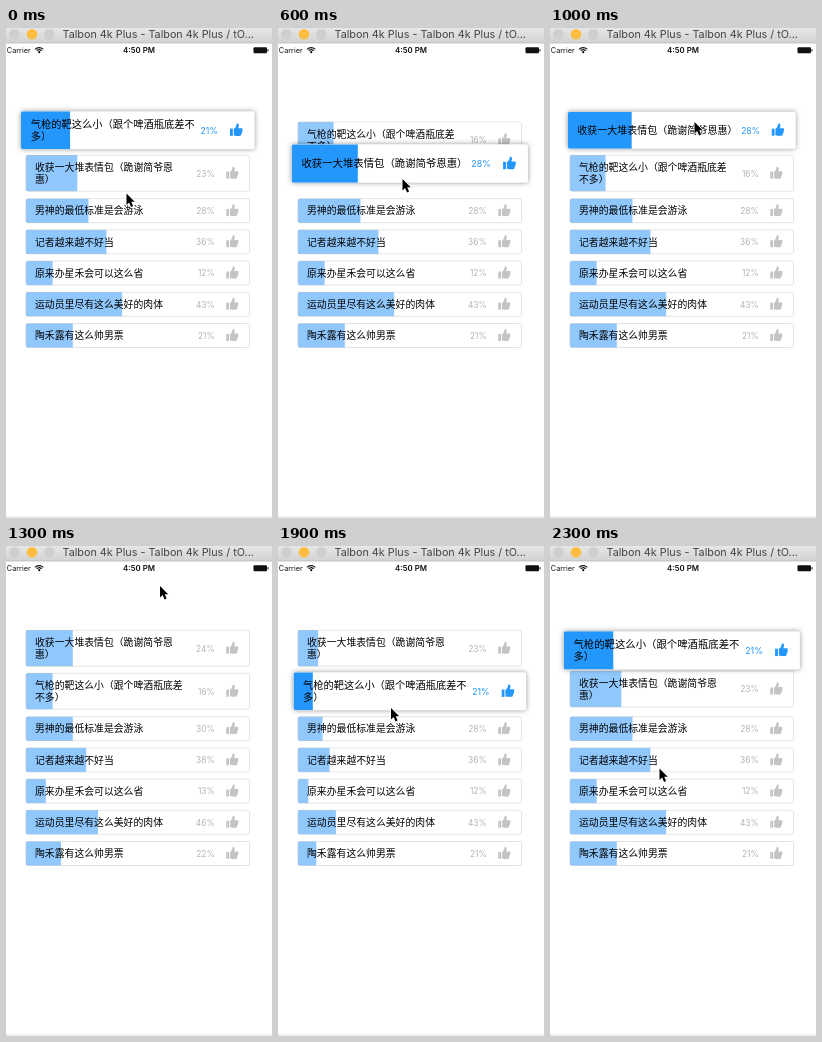
These frames come from a looping animation (266x490 px, 2.4 s). An HTML page with a canvas:

```html
<!DOCTYPE html>
<html lang="zh">
<head>
<meta charset="utf-8">
<title>Poll</title>
<style>
html, body { margin: 0; width: 100%; height: 100%; overflow: hidden; background: #fff; }
canvas { display: block; width: 266px; height: 490px; }
</style>
</head>
<body>
<canvas id="stage"></canvas>
<script>
const W = 266, H = 490, LOOP = 2400, STEP = 100;
const LEFT = 19.7, WIDTH = 224.2, TOP = 84, SWAP = 43;
const BLUE = '#2397fb', PALE = '#90c8fd';
const CJK = '"Noto Sans CJK SC", "Noto Sans CJK", sans-serif';
const LATIN = 'Inter, Roboto, sans-serif';

const canvas = document.getElementById('stage');
const ctx = canvas.getContext('2d');
const dpr = window.devicePixelRatio || 1;
canvas.width = W * dpr;
canvas.height = H * dpr;

// wide: line breaks used while the row is selected
const rows = [
  { lines: ['气枪的靶这么小（跟个啤酒瓶底差', '不多）'], wide: ['气枪的靶这么小（跟个啤酒瓶底差不', '多）'] },
  { lines: ['收获一大堆表情包（跪谢简爷恩', '惠）'], wide: ['收获一大堆表情包（跪谢简爷恩惠）'] },
  { lines: ['男神的最低标准是会游泳'] },
  { lines: ['记者越来越不好当'] },
  { lines: ['原来办星禾会可以这么省'] },
  { lines: ['运动员里尽有这么美好的肉体'] },
  { lines: ['陶禾露有这么帅男票'] }
];

const FIRST = [21, 23, 28, 36, 12, 43, 21];
const SECOND = [16, 28, 28, 36, 12, 43, 21];
const OPEN = [16, 24, 30, 38, 13, 46, 22];
const VOTE_2 = 232, CANCEL = 1200, VOTE_1 = 1742;

// time, x, y of the pointer tip
const pointer = [
  [0, 120.5, 165.5], [300, 124, 150.5], [600, 124.5, 151], [700, 125, 150],
  [1000, 144.5, 94], [1200, 160, 9], [1300, 154, 40], [1600, 113, 162],
  [2100, 113, 162], [2300, 109.5, 222.5], [2400, 120.5, 165.5]
];

const mix = (a, b, p) => a + (b - a) * p;

function ease(t, start, length) {
  const p = Math.min(1, Math.max(0, (t - start) / length));
  return (1 - Math.cos(Math.PI * p)) / 2;
}

function lift(t, vote) {
  return ease(t, vote, 250) - ease(t, vote + 548, 350);
}

function stateAt(t) {
  if (t < VOTE_2) return { sel: 0, pct: FIRST, bars: FIRST, lift: lift(t + LOOP, VOTE_1) };
  if (t < CANCEL) {
    const p = ease(t, VOTE_2 + 28, 300);
    const bars = SECOND.map((v, i) => i === 1 ? v * p : mix(FIRST[i], v, p));
    return { sel: 1, pct: SECOND, bars, lift: lift(t, VOTE_2) };
  }
  if (t < VOTE_1) {
    const p = 1 - ease(t, CANCEL, 300);
    return { sel: -1, pct: OPEN, bars: SECOND.map(v => v * p), lift: 0 };
  }
  const p = ease(t, VOTE_1 + 28, 300);
  return { sel: 0, pct: FIRST, bars: FIRST.map(v => v * p), lift: lift(t, VOTE_1) };
}

function text(str, x, y, font, color, align = 'left') {
  ctx.font = font;
  ctx.fillStyle = color;
  ctx.textAlign = align;
  ctx.textBaseline = 'alphabetic';
  ctx.fillText(str, x, y);
}

function disc(x, y, r, color) {
  ctx.fillStyle = color;
  ctx.beginPath();
  ctx.arc(x, y, r, 0, Math.PI * 2);
  ctx.fill();
}

function box(x, y, w, h, r) {
  ctx.beginPath();
  ctx.roundRect(x, y, w, h, r);
}

function thumb(x, y, color) {
  ctx.save();
  ctx.translate(x, y);
  ctx.fillStyle = color;
  ctx.fillRect(0, 5, 2.7, 7);
  ctx.fill(new Path2D('M3.6 5.2 C5.4 4.4 6 2.6 6.2 .8 C6.4 -.4 8.4 -.2 8.5 1.6 C8.6 2.8 8.1 3.8 7.8 4.6 H11.2 C12.4 4.7 12.4 6 11.8 6.5 C12.3 7.2 12 8.1 11.4 8.4 C11.7 9.2 11.3 9.9 10.8 10.2 C11 11.2 10.4 12 9.4 12 H6 C5 12 4.4 11.5 3.6 11.3 Z'));
  ctx.restore();
}

function drawRow(i, y, h, s) {
  const on = s.sel === i;
  const mid = y + h / 2;
  ctx.save();
  if (on) {
    const k = 1 + 0.054 * s.lift, cx = LEFT + WIDTH / 2;
    ctx.translate(cx, mid);
    ctx.scale(k, k);
    ctx.translate(-cx, -mid);
    ctx.shadowColor = 'rgba(0,0,0,.42)';
    ctx.shadowBlur = 5 * dpr;
  }
  box(LEFT, y, WIDTH, h, 2);
  ctx.fillStyle = '#fff';
  ctx.fill();
  ctx.shadowColor = 'transparent';

  ctx.save();
  ctx.clip();
  ctx.fillStyle = on ? BLUE : PALE;
  ctx.fillRect(LEFT, y, WIDTH * s.bars[i] / 100, h);
  ctx.restore();
  if (!on) {
    box(LEFT + .3, y + .3, WIDTH - .6, h - .6, 2);
    ctx.strokeStyle = 'rgba(190,190,190,.6)';
    ctx.lineWidth = .7;
    ctx.stroke();
  }

  const lines = on && rows[i].wide || rows[i].lines;
  const base = mid + 3.6 - (lines.length - 1) * 6;
  lines.forEach((line, n) => text(line, 29, base + n * 12, '9.85px ' + CJK, '#000'));
  text(s.pct[i] + '%', 208.7, mid + 3.3, '8.4px ' + LATIN, on ? BLUE : '#b4b4b4', 'right');
  thumb(220.3, mid - 6.6, on ? BLUE : '#c4c4c4');
  ctx.restore();
}

function drawRows(t) {
  const s = stateAt(t);
  const shift = SWAP * (ease(t, 490, 350) - ease(t, 2000, 350));
  const draw = i => {
    if (i < 2) drawRow(i, TOP + (i ? SWAP - shift : shift), 36.5, s);
    else drawRow(i, 170.4 + (i - 2) * 31.2, 24.6, s);
  };
  rows.forEach((_, i) => { if (i !== s.sel) draw(i); });
  if (s.sel >= 0) draw(s.sel);
}

function drawChrome() {
  const g = ctx.createLinearGradient(0, 0, 0, 15);
  g.addColorStop(0, '#e6e6e6');
  g.addColorStop(1, '#d2d2d2');
  ctx.fillStyle = g;
  ctx.fillRect(0, 0, W, 15);
  ctx.fillStyle = '#b8b8b8';
  ctx.fillRect(0, 14.6, W, .8);
  disc(8.5, 6.3, 5.3, '#cfcfcf');
  disc(26, 6.3, 5.3, '#fdbc40');
  disc(43.3, 6.3, 5.3, '#cfcfcf');
  text('Talbon 4k Plus - Talbon 4k Plus / tO...', 56.5, 10.3, '10.8px ' + LATIN, '#444');

  text('Carrier', .8, 25, '7.3px ' + LATIN, '#111');
  text('4:50 PM', 133, 25.2, '600 7.8px ' + LATIN, '#111', 'center');
  ctx.strokeStyle = '#111';
  ctx.lineWidth = 1.2;
  for (const r of [3.4, 5.6]) {
    ctx.beginPath();
    ctx.arc(33.2, 25.2, r, -Math.PI * .76, -Math.PI * .24);
    ctx.stroke();
  }
  disc(33.2, 24.2, 1.1, '#111');
  box(247.5, 19.3, 13.5, 6, 1);
  ctx.fillStyle = '#111';
  ctx.fill();
  ctx.fillRect(261.5, 21.2, 1, 2.2);

  ctx.fillStyle = '#dedede';
  ctx.fillRect(0, 488.5, W, 1);
}

function drawPointer(t) {
  const n = pointer.findIndex(k => k[0] > t);
  const [t0, x0, y0] = pointer[n - 1], [t1, x1, y1] = pointer[n];
  const p = (t - t0) / (t1 - t0);
  ctx.save();
  ctx.translate(mix(x0, x1, p), mix(y0, y1, p));
  const arrow = new Path2D('M0 0 V11.4 L2.6 9 L4.6 13.5 L6.6 12.6 L4.7 8.3 H8.2 Z');
  ctx.lineJoin = 'round';
  ctx.strokeStyle = '#fff';
  ctx.lineWidth = 1.5;
  ctx.stroke(arrow);
  ctx.fillStyle = '#000';
  ctx.fill(arrow);
  ctx.restore();
}

function render(t) {
  ctx.setTransform(dpr, 0, 0, dpr, 0, 0);
  ctx.fillStyle = '#fff';
  ctx.fillRect(0, 0, W, H);
  drawChrome();
  drawRows(t);
  drawPointer(t);
}

const start = performance.now();
function tick() {
  const t = (performance.now() - start) % LOOP;
  render(Math.floor(t / STEP) * STEP);
  requestAnimationFrame(tick);
}
tick();
</script>
</body>
</html>
```
